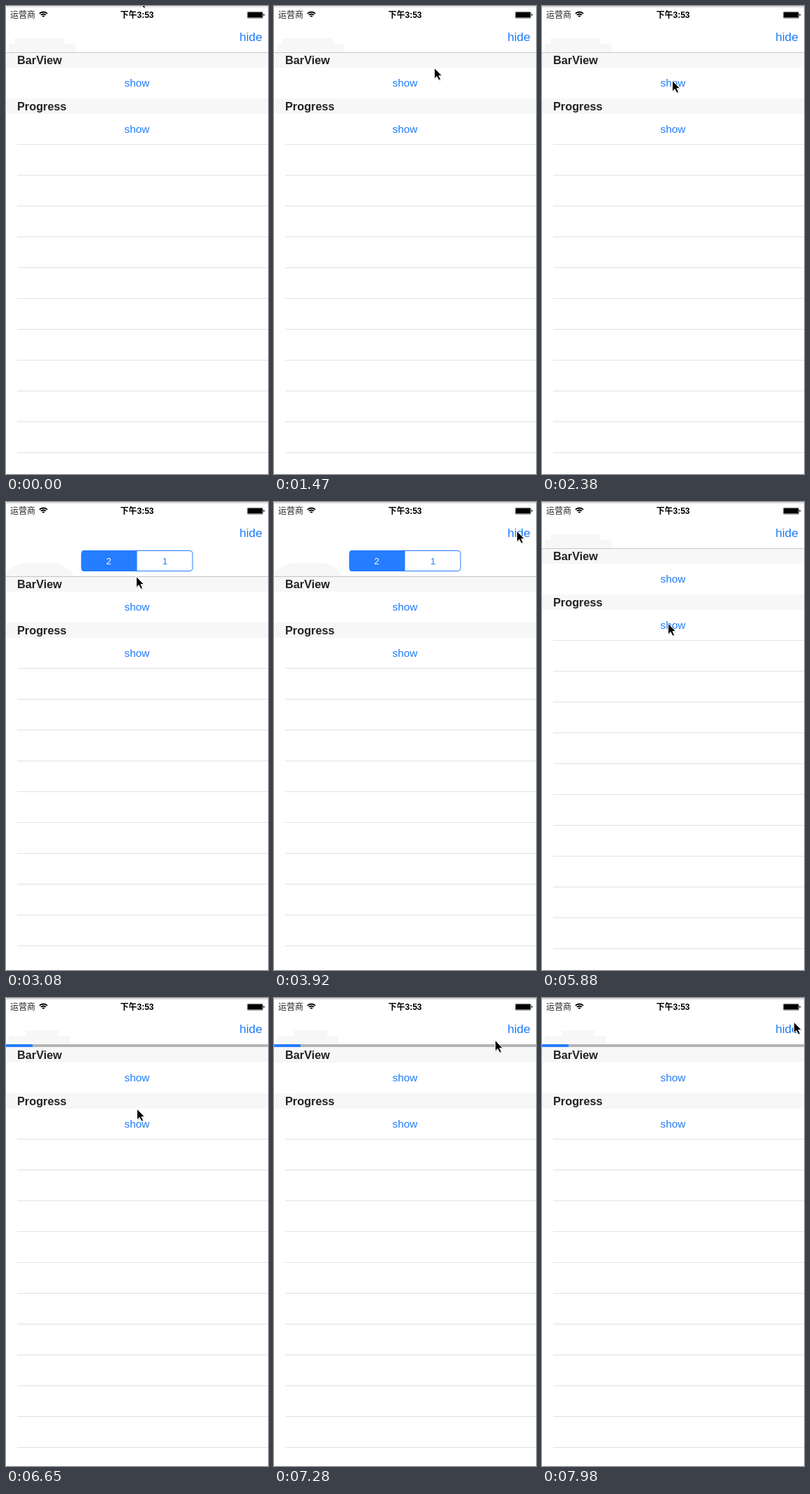
An HTML page that plays this animation: 375 px wide and 668 px high, repeating every 8 s.

```html
<!DOCTYPE html>
<html lang="zh">
<head>
<meta charset="utf-8">
<style>
  html, body { margin: 0; width: 100%; height: 100%; overflow: hidden; background: #fff; }
  svg { display: block; width: 375px; height: 668px; }
  text { font-family: "Liberation Sans", "Noto Sans CJK SC", "Noto Sans CJK", sans-serif; }
  .link { font-size: 15.4px; fill: #217cf8; text-anchor: middle; }
  .head { font-size: 16.3px; font-weight: bold; fill: #222; }
  .status { font-size: 12px; }
  .tab { font-size: 13px; text-anchor: middle; }
  #hide { font-size: 17.3px; }
</style>
</head>
<body>
<svg viewBox="0 0 375 668">
  <g id="table"></g>

  <g id="navShade" fill="#f7f7f7">
    <rect id="shadeTop" y="46" height="8"/>
    <rect id="shadeBase" x="4" y="54" height="12"/>
  </g>
  <rect id="navLine" y="66" width="375" height="1" fill="#c9c9c9"/>

  <g id="bar">
    <rect y="66" width="375" height="40" fill="#fff"/>
    <path d="M0 100Q14 87 34 87H66Q84 87 98 106H0Z" fill="#f7f7f7"/>
    <rect y="106" width="375" height="1" fill="#c4c4c4"/>
    <rect x="108" y="69.5" width="159" height="29" rx="4" fill="#fff" stroke="#257dff"/>
    <path d="M187.5 69H112a4 4 0 0 0-4 4V95a4 4 0 0 0 4 4H187.5Z" fill="#257dff"/>
    <text class="tab" x="147" y="88.5" fill="#fff">2</text>
    <text class="tab" x="227.5" y="88.5" fill="#257dff">1</text>
  </g>

  <g id="progress">
    <rect y="66" width="375" height="4" fill="#b4b4b4"/>
    <rect y="66" width="38" height="4" fill="#257dff"/>
  </g>

  <rect id="topLine" y="0.5" width="375" height="1"/>
  <text class="status" x="6" y="17" fill="#222">运营商</text>
  <g id="wifi" fill="none" stroke="#000" stroke-width="1.8"></g>
  <text class="status" x="187.5" y="17" font-weight="bold" text-anchor="middle">下午3:53</text>
  <rect x="345.25" y="8.25" width="22.5" height="9" rx="1.5" fill="#fff" stroke="#000" stroke-width="0.5"/>
  <rect x="346" y="9" width="21" height="7.5" rx="0.6"/>
  <path d="M368.5 11V14Q370 14 370 12.5T368.5 11Z"/>
  <text id="hide" class="link" x="350.5" y="50">hide</text>

  <g id="cursor">
    <g transform="translate(-.5 -.7)">
      <use href="#arrow" x="0.6" y="1.2" opacity="0.2"/>
      <path id="arrow" d="M0 0V15.5L3.6 12.2L6.3 17.8L9 16.6L6.5 11.2H11Z"/>
      <use href="#arrow" stroke="#fff"/>
    </g>
  </g>
</svg>
<script>
const LOOP = 8000, STEP = 70, ROW = 44;
const $ = id => document.getElementById(id);

// Each pointer move slows down towards its goal: start, end, x, y.
const moves = [
  [140, 490, 116, 107],
  [700, 1120, 332, 47],
  [1260, 1890, 187, 107],
  [3360, 3780, 348, 42],
  [5110, 5740, 181, 174],
  [6370, 6650, 188, 159],
  [6650, 7210, 303, 70],
  [7210, 7980, 361, 35]
];

const mix = (a, b, p) => a + (b - a) * p;
const span = (t, start, end) => Math.min(1, Math.max(0, (t - start) / (end - start)));
const easeOut = p => 1 - (1 - p) ** 3;

function ramp(t, start, end) {
  const p = span(t, start, end);
  return p * p * (3 - 2 * p);
}

function pointerAt(t) {
  let x = 191, y = -14;
  for (const [start, end, goalX, goalY] of moves) {
    const p = easeOut(span(t, start, end));
    x = mix(x, goalX, p);
    y = mix(y, goalY, p);
  }
  return [Math.round(x), Math.round(y)];
}

function set(node, attrs) {
  for (const name in attrs) node.setAttribute(name, attrs[name]);
}

function add(parent, tag, attrs, label = "") {
  const node = document.createElementNS("http://www.w3.org/2000/svg", tag);
  set(node, attrs);
  node.textContent = label;
  $(parent).append(node);
}

function build() {
  ["BarView", "Progress"].forEach((title, i) => {
    const y = 66 + 66 * i;
    add("table", "rect", { y, width: 375, height: 22, fill: "#f7f7f7" });
    add("table", "text", { class: "head", x: 16, y: y + 17 }, title);
    add("table", "text", { class: "link", x: 187.5, y: y + 49 }, "show");
  });
  for (let y = 197; y < 668; y += ROW)
    add("table", "rect", { x: 16, y, width: 359, height: 1, fill: "#e1e1e3" });
  for (let r = 2; r <= 8; r += 3) {
    const d = r * Math.SQRT1_2;
    add("wifi", "path", { d: `M${53.5 - d} ${16.5 - d}a${r} ${r} 0 0 1 ${2 * d} 0` });
  }
}

const move = (id, x, y) => set($(id), { transform: `translate(${x} ${y})` });
const fade = (id, opacity) => set($(id), { opacity });

function draw(time) {
  const t = Math.floor(time / STEP) * STEP;
  const opened = ramp(t, 2520, 2940);
  const barAlpha = opened * (1 - ramp(t, 4690, 4932));
  const progress = ramp(t, 6090, 6300);
  const offset = 40 * opened * (1 - ramp(t, 4900, 5250)) + 4 * progress;

  move("table", 0, Math.round(offset * 2) / 2);
  fade("bar", barAlpha);
  fade("progress", progress);
  fade("navLine", (1 - barAlpha) * (1 - progress));
  fade("navShade", offset < 20 ? 1 : 0);
  set($("shadeTop"), { x: mix(12, 28, progress), width: mix(72, 48, progress) });
  set($("shadeBase"), { width: mix(96, 88, progress) });
  set($("topLine"), { fill: t < 2380 ? "#cfcfcf" : "#b2b2b2" });
  fade("hide", t < 4550 ? 1 : mix(0.2, 1, ramp(t, 4690, 5040)));
  move("cursor", ...pointerAt(t));
}

build();
const start = performance.now();
function tick() {
  draw((performance.now() - start) % LOOP);
  requestAnimationFrame(tick);
}
tick();
</script>
</body>
</html>
```
